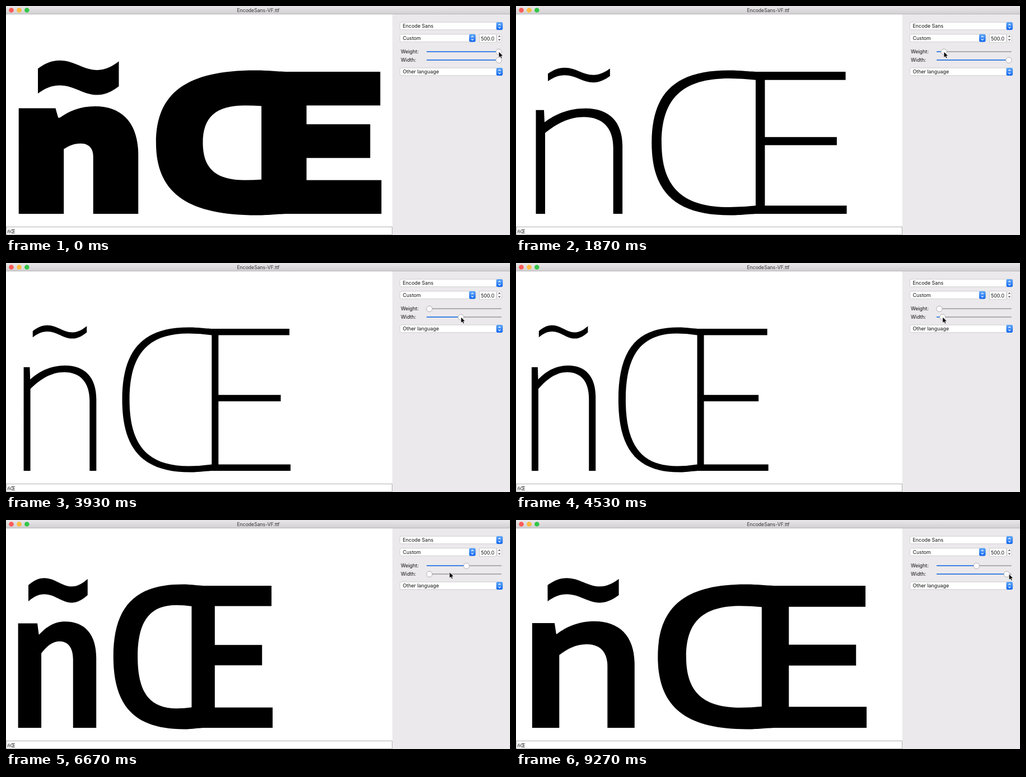
Animation, 900 px wide and 411 px high, one loop 9340 ms. Source, as an HTML page:

```html
<!DOCTYPE html>
<html lang="en">
<head>
<meta charset="utf-8">
<title>Variable font preview</title>
<style>
  html, body { margin: 0; width: 100%; height: 100%; overflow: hidden; background: #fff; }
  svg { display: block; }
  text { font: 8.9px Inter, sans-serif; fill: #111; }
  text.title { font-size: 8.65px; fill: #333; text-anchor: middle; }
  .box { fill: #fff; stroke: #c2c0c2; stroke-width: .7; }
  .arrows { fill: none; stroke: #fff; stroke-width: 1.1; }
  .arrows.dark { stroke: #333; }
</style>
</head>
<body>
<svg width="900" height="411" viewBox="0 0 900 411">
  <defs>
    <linearGradient id="bar" x2="0" y2="1">
      <stop stop-color="#e9e7e9"/><stop offset="1" stop-color="#d1cfd1"/>
    </linearGradient>
    <linearGradient id="blue" x2="0" y2="1">
      <stop stop-color="#5fa8f8"/><stop offset="1" stop-color="#1468f0"/>
    </linearGradient>
  </defs>
  <rect width="900" height="411" fill="#fff"/>
  <rect x="690" y="15" width="210" height="396" fill="#ebe9eb"/>
  <rect width="900" height="15" fill="url(#bar)"/>
  <rect y="14" width="900" height="1" fill="#b9b7b9"/>
  <circle cx="9.5" cy="7.5" r="4.3" fill="#fc5b57"/>
  <circle cx="23.5" cy="7.5" r="4.3" fill="#fdbb3e"/>
  <circle cx="37.3" cy="7.5" r="4.3" fill="#34c648"/>
  <text class="title" x="450.5" y="10.7">EncodeSans-VF.ttf</text>
  <path id="glyphs" fill-rule="evenodd"/>
  <rect x=".5" y="396.5" width="689" height="14" fill="#fff" stroke="#b3b1b3"/>
  <text x="2.5" y="407.5">ñŒ</text>
  <g id="panel"></g>
  <text x="705" y="85">Weight:</text>
  <text x="705" y="99.6">Width:</text>
  <g id="sliders"></g>
  <path id="cursor" d="M0 0V10.6L2.5 8.4L4.2 12L6 11.2L4.4 7.7H7.7Z" stroke="#fff" stroke-width=".7"/>
</svg>
<script>
const $ = id => document.getElementById(id);
const mix = (a, b, t) => a + (b - a) * t;
const ramp = (t, from, to) => Math.min(1, Math.max(0, (t - from) / (to - from)));
const LOOP = 9340, STEP = 1000 / 15;
const BASE = 373, BOWL = .69, ARCH = .64;

// Quarter curves leaving horizontally or vertically
const outward = (x, y, X, Y, k) => `C${mix(x, X, k)} ${y} ${X} ${mix(Y, y, k)} ${X} ${Y}`;
const upward = (x, y, X, Y, k) => `C${x} ${mix(y, Y, k)} ${mix(X, x, k)} ${Y} ${X} ${Y}`;

// In the glyphs, w is weight, d is width, both 0..1; extra is the stem's growth over the thinnest
const THIN = 12;
const stemGrowth = (w, d) => (55 + 13.5 * d) * w;

function nPath(w, d) {
  const extra = stemGrowth(w, d), stem = THIN + extra;
  const left = 27.5 + 8.9 * d - .2 * extra;
  const width = 112.5 + 38 * d + .92 * extra;
  const right = left + width, inLeft = left + stem, inRight = right - stem;
  const spur = left + 1.3 + .8 * stem, notch = spur + .06 * stem, notchY = 209 - .125 * extra;
  const start = notch + .04 * extra;
  const topX = left + width * (.57 + .001 * extra), topY = 184 - .06 * extra;
  const inX = mix(inLeft, inRight, .57), inY = topY + THIN + .8 * extra;
  const shoulder = 240 + 10 * d + .25 * extra, join = 226 + .45 * extra;
  return `M${left} ${BASE}V${187 - .052 * extra}H${spur}L${notch} ${notchY}H${start}` +
    `C${mix(start, topX, .25)} ${mix(notchY, topY, .55)} ${mix(start, topX, .57)} ${topY} ${topX} ${topY}` +
    outward(topX, topY, right, shoulder, ARCH) + `V${BASE}H${inRight}V${shoulder + 3}` +
    upward(inRight, shoulder + 3, inX, inY, ARCH) +
    `C${mix(inX, inLeft, .4)} ${inY} ${mix(inLeft, inX, .28)} ${mix(join, inY, .55)} ${inLeft} ${join}V${BASE}Z`;
}

function tildePath(w, d) {
  const left = 40 + 17 * d, width = 86.5 + 22 * d + 36 * w, crest = 111.7 - 14 * w;
  const lift = 10.5 + 4 * w, drop = 12.7 + 4.5 * w, thick = 11.2 + 33.5 * w;
  const upper = [
    [0, lift], [.09, lift * .35], [.17, 0], [.27, 0], [.45, 0],
    [.56, drop], [.735, drop], [.84, drop], [.93, drop * .55], [1, 1.5]
  ].map(([x, y]) => [left + width * x, crest + y]);
  const lower = upper.map(([x, y]) => [x, y + thick]).reverse();
  return `M${upper[0]}C${upper.slice(1).join(' ')}L${lower[0]}C${lower.slice(1).join(' ')}Z`;
}

function oePath(w, d) {
  const extra = stemGrowth(w, d), stem = THIN + extra, bar = 11.5 + (46.5 + 2.5 * d) * w;
  const left = 180 + 60.5 * d + .4 * extra;
  const topX = left + 105 + 29.5 * d + .62 * extra, topY = 115.5;
  const joinX = left + 145 + 46 * d + .72 * extra, joinY = 118;
  const stemX = left + 138.5 + 47 * d + .04 * extra, stemRight = stemX + stem;
  const end = left + 262 + 80.5 * d + (38 + 20 * d) * w, midEnd = end - 15.5 - 2.5 * w;
  const inLeft = left + .7 + 1.03 * stem, inX = mix(inLeft, stemX, .72);
  const inY = 114.3 + 1.06 * bar, inStemY = inY + 3 - 2 * w;
  const center = (joinY + BASE) / 2, midY = 242.5, flip = y => 2 * center - y;
  const ease1 = mix(topX, joinX, .45), ease2 = mix(topX, joinX, .6), bend = mix(inX, stemX, .5);
  return `M${topX} ${topY}C${ease1} ${topY} ${ease2} ${joinY} ${joinX} ${joinY}` +
    `H${end}V${joinY + bar}H${stemRight}V${midY - bar / 2}H${midEnd}V${midY + bar / 2}H${stemRight}` +
    `V${BASE - bar}H${end + 2}V${BASE}H${joinX}` +
    `C${ease2} ${BASE} ${ease1} ${flip(topY)} ${topX + 3} ${flip(topY)}` +
    outward(topX + 3, flip(topY), left, center, BOWL) + upward(left, center, topX, topY, BOWL) + 'Z' +
    `M${stemX} ${inStemY}Q${bend} ${inY} ${inX} ${inY}` + outward(inX, inY, inLeft, center, BOWL) +
    upward(inLeft, center, inX, flip(inY), BOWL) +
    `Q${bend} ${flip(inY)} ${stemX} ${flip(inStemY)}Z`;
}

function popup(y, right, label) {
  const x = right - 11.5, c = right - 5.7;
  return `<rect class="box" x="703.5" y="${y}" width="${right - 703.5}" height="13.5" rx="2.5"/>
    <rect x="${x}" y="${y - .3}" width="11.5" height="14" rx="2.3" fill="url(#blue)"/>
    <path class="arrows" d="M${c - 2} ${y + 5.3}l2 -2l2 2M${c - 2} ${y + 8.4}l2 2l2 -2"/>
    <text x="708.5" y="${y + 10.2}">${label}</text>`;
}

$('panel').innerHTML = popup(29.2, 887, 'Encode Sans') + popup(50.7, 838.5, 'Custom') +
  popup(111.2, 887, 'Other language') +
  `<rect class="box" x="845.5" y="50.5" width="30" height="14.5"/>
   <text x="848" y="61.5">500.0</text>
   <rect class="box" x="877" y="50.5" width="8" height="14" rx="2.5"/>
   <path class="arrows dark" d="M879.3 55.5l1.7 -1.9l1.7 1.9M879.3 59.5l1.7 1.9l1.7 -1.9"/>`;

const WEIGHT_Y = 82, WIDTH_Y = 97;
const knobX = value => 756 + 124 * value;

function slider(value, y) {
  const x = knobX(value);
  return `<rect x="751" y="${y - 1}" width="134" height="2" rx="1" fill="#aeacae"/>
    <rect x="751" y="${y - 1}" width="${x - 751}" height="2" rx="1" fill="#3b82e4"/>
    <circle cx="${x}" cy="${y + .3}" r="5.2" fill="#fbfafb" stroke="#a09ea0" stroke-width=".8"/>`;
}

function draw(time) {
  const t = Math.floor((time % LOOP + 3.4) / STEP) * STEP;
  const weight = 1 - ramp(t, 100, 1990) + .535 * ramp(t, 5450, 6430);
  const width = 1 - ramp(t, 3130, 4603) + ramp(t, 7888, 9309);
  // The hand is 0 on the weight slider and 1 on the width slider
  const hand = ramp(t, 2200, 2950) - ramp(t, 4850, 5330) + ramp(t, 6480, 6840);
  const x = mix(knobX(weight), knobX(width), hand) + 4 * ramp(t, 4700, 5330);
  const y = mix(WEIGHT_Y, WIDTH_Y, hand) + 4 * Math.sin(Math.PI * hand);

  $('glyphs').setAttribute('d', nPath(weight, width) + tildePath(weight, width) + oePath(weight, width));
  $('sliders').innerHTML = slider(weight, WEIGHT_Y) + slider(width, WIDTH_Y);
  $('cursor').setAttribute('transform', `translate(${x} ${y})`);
}

const start = performance.now();
function tick() {
  draw(performance.now() - start);
  requestAnimationFrame(tick);
}
tick();
</script>
</body>
</html>
```
